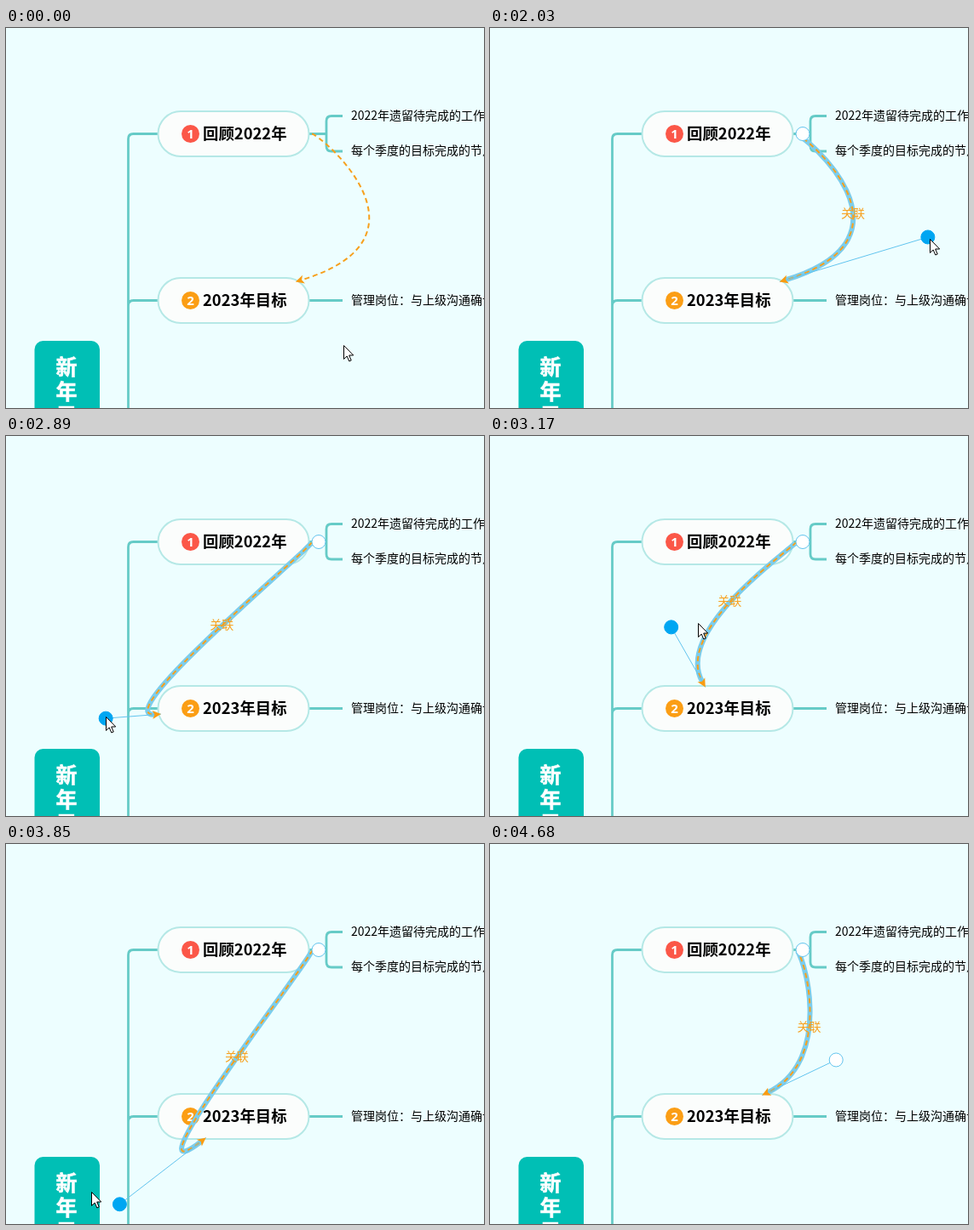
Write an HTML page that moves like this. It is 561 px wide and 447 px high and loops after 5.21 s.

```html
<!DOCTYPE html>
<html lang="zh-CN">
<head>
<meta charset="utf-8">
<style>
html, body { margin: 0; width: 100%; height: 100%; overflow: hidden; background: #edfeff; }
svg { display: block; font-family: "Noto Sans CJK SC", "Noto Sans CJK", sans-serif; font-size: 14px; }
.tree { fill: none; stroke: #66cbc7; stroke-width: 2.8; }
.pill { fill: #fbfdfc; stroke: #b5e8e6; stroke-width: 2; }
.title { font-size: 18.4px; font-weight: 700; }
.badge { font: 700 15px "Open Sans", sans-serif; fill: #fff; text-anchor: middle; }
.root { font-size: 25px; font-weight: 700; fill: #fff; stroke: #fff; stroke-width: .6; text-anchor: middle; }
.knob { fill: #fff; stroke: #62c4ee; }
.knob.on { fill: #00a6f2; stroke: #00a6f2; }
</style>
</head>
<body>
<svg width="561" height="447" viewBox="0 0 561 447">
  <path class="tree" d="M143.5 447V130.5Q143.5 124.5 149.5 124.5H178M143.5 326.5Q143.5 320.5 149.5 320.5H178
    M356 124.5H376M395 103.5H382Q376 103.5 376 109.5V139Q376 145 382 145H395M356 320.5H395"/>
  <rect class="pill" x="178.5" y="98" width="177" height="53" rx="26.5"/>
  <rect class="pill" x="178.5" y="294" width="177" height="53" rx="26.5"/>
  <circle cx="216.5" cy="124.5" r="10.5" fill="#fb5748"/>
  <circle cx="216.5" cy="320.5" r="10.5" fill="#fb9e15"/>
  <text class="badge" x="216.5" y="130">1</text>
  <text class="badge" x="216.5" y="326">2</text>
  <text class="title" x="231" y="131">回顾2022年</text>
  <text class="title" x="231" y="327">2023年目标</text>
  <text x="405" y="108">2022年遗留待完成的工作</text>
  <text x="405" y="149">每个季度的目标完成的节点</text>
  <text x="405" y="325">管理岗位：与上级沟通确认</text>
  <rect x="33.5" y="368" width="76.5" height="100" rx="10" fill="#00bfb5"/>
  <text class="root"><tspan x="71" y="408">新</tspan><tspan x="71" y="437">年</tspan><tspan x="71" y="465">目</tspan></text>

  <path id="glow" fill="none" stroke="#7ccdec" stroke-width="6"/>
  <path id="dash" fill="none" stroke="#f7a01d" stroke-width="2" stroke-dasharray="6 4"/>
  <path id="arm" stroke="#62c4ee"/>
  <path id="head" d="M0 0L10 -5L7.5 0L10 5Z" fill="#f99c12"/>
  <text id="label" text-anchor="middle" fill="#f7a01d">关联</text>
  <g id="knobs">
    <circle class="knob" cx="367" cy="124.5" r="8"/>
    <circle class="knob" id="knob" r="8"/>
  </g>
  <path id="cursor" d="M.5 .5V16.5L4.2 13L6.8 19L9.2 18L6.7 12H11.7Z" fill="#fff" stroke="#000"/>
</svg>
<script>
const el = Object.fromEntries([...document.querySelectorAll('[id]')].map(e => [e.id, e]));
const LOOP = 5210, GRAB = 2180, DROP = 4320, LAG = 25;

// time, x, y before the drag
const approach = [[120, 394, 371], [640, 384, 288], [960, 384, 283], [1480, 491, 277], [2030, 514, 246]];
// time, angle, radius of the two turns of the drag
const turns = [[2180, -0.55, 245], [2865, 2.91, 193], [2890, 2.955, 193], [3435, 6.14, 196],
  [3825, 8.5, 285], [4295, 11.73, 151]];

// monotone cubic through keys of [time, a, b]
function ease(keys, t) {
  const last = keys.length - 1;
  t = Math.min(keys[last][0], Math.max(keys[0][0], t));
  let i = 0;
  while (i < last - 1 && t > keys[i + 1][0]) i++;
  const [a, b] = [keys[i], keys[i + 1]], h = b[0] - a[0], u = (t - a[0]) / h, v = 1 - u;
  const rise = (j, k) => (keys[j + 1][k] - keys[j][k]) / (keys[j + 1][0] - keys[j][0]);
  const slope = (j, k) => {
    if (j < 1 || j === last) return 0;
    const p = rise(j - 1, k), q = rise(j, k);
    return p * q > 0 ? 2 * p * q / (p + q) : 0;
  };
  return [1, 2].map(k => v * v * (1 + 2 * u) * a[k] + u * u * (3 - 2 * u) * b[k]
    + h * u * v * (v * slope(i, k) - u * slope(i + 1, k)));
}

function pointer(t) {
  if (t < GRAB) return ease(approach, t);
  const [angle, r] = ease(turns, t);
  const fall = Math.max(0, (t - 4560) / 120);
  return [305 + r * Math.cos(angle), 310 + r / 2 * Math.sin(angle) + 200 * fall * fall];
}

// where the ray from the second node towards the knob leaves its pill
function anchor(x, y) {
  const dx = x - 267, dy = y - 320.5, len = Math.hypot(dx, dy);
  const ux = dx / len, uy = dy / len, r = 25, half = 61;
  let s = r / Math.abs(uy);
  if (s * Math.abs(ux) > half)
    s = half * Math.abs(ux) + Math.sqrt(Math.max(0, r * r - half * half * uy * uy));
  return { x: 267 + s * ux, y: 320.5 + s * uy, ux, uy };
}

const set = (e, attrs) => { for (const k in attrs) e.setAttribute(k, attrs[k]); };
const show = (e, on) => { e.style.display = on ? '' : 'none'; };

function draw(t) {
  const [kx, ky] = pointer(Math.min(DROP, Math.max(GRAB + LAG, t)) - LAG);
  const [px, py] = pointer(t);
  const tip = anchor(kx, ky), hover = t >= 670, selected = t >= 960;
  const d = `M359 124.5C367 124.5 ${kx} ${ky} ${tip.x + 7 * tip.ux} ${tip.y + 7 * tip.uy}`;

  set(el.glow, { d, opacity: selected ? 1 : 0.6 });
  set(el.dash, { d });
  set(el.arm, { d: `M${tip.x} ${tip.y}L${kx} ${ky}` });
  const angle = Math.atan2(tip.uy, tip.ux) * 180 / Math.PI;
  set(el.head, { transform: `translate(${tip.x} ${tip.y}) rotate(${angle})` });
  const mid = el.dash.getPointAtLength(el.dash.getTotalLength() / 2);
  set(el.label, { x: mid.x, y: mid.y + 3.8 });
  set(el.knob, { cx: kx, cy: ky });
  const active = t >= GRAB && t < DROP || Math.hypot(px - kx, py - ky) < 9;
  el.knob.classList.toggle('on', active);
  set(el.cursor, { transform: `translate(${Math.round(px + 2)} ${Math.round(py + 2)})` });

  show(el.glow, hover);
  show(el.label, hover);
  show(el.arm, selected);
  show(el.knobs, selected);
  show(el.cursor, t < 4680);
}

const start = performance.now();
function tick() {
  const t = (performance.now() - start) % LOOP;
  draw(t - t % 10);
  requestAnimationFrame(tick);
}
tick();
</script>
</body>
</html>
```
